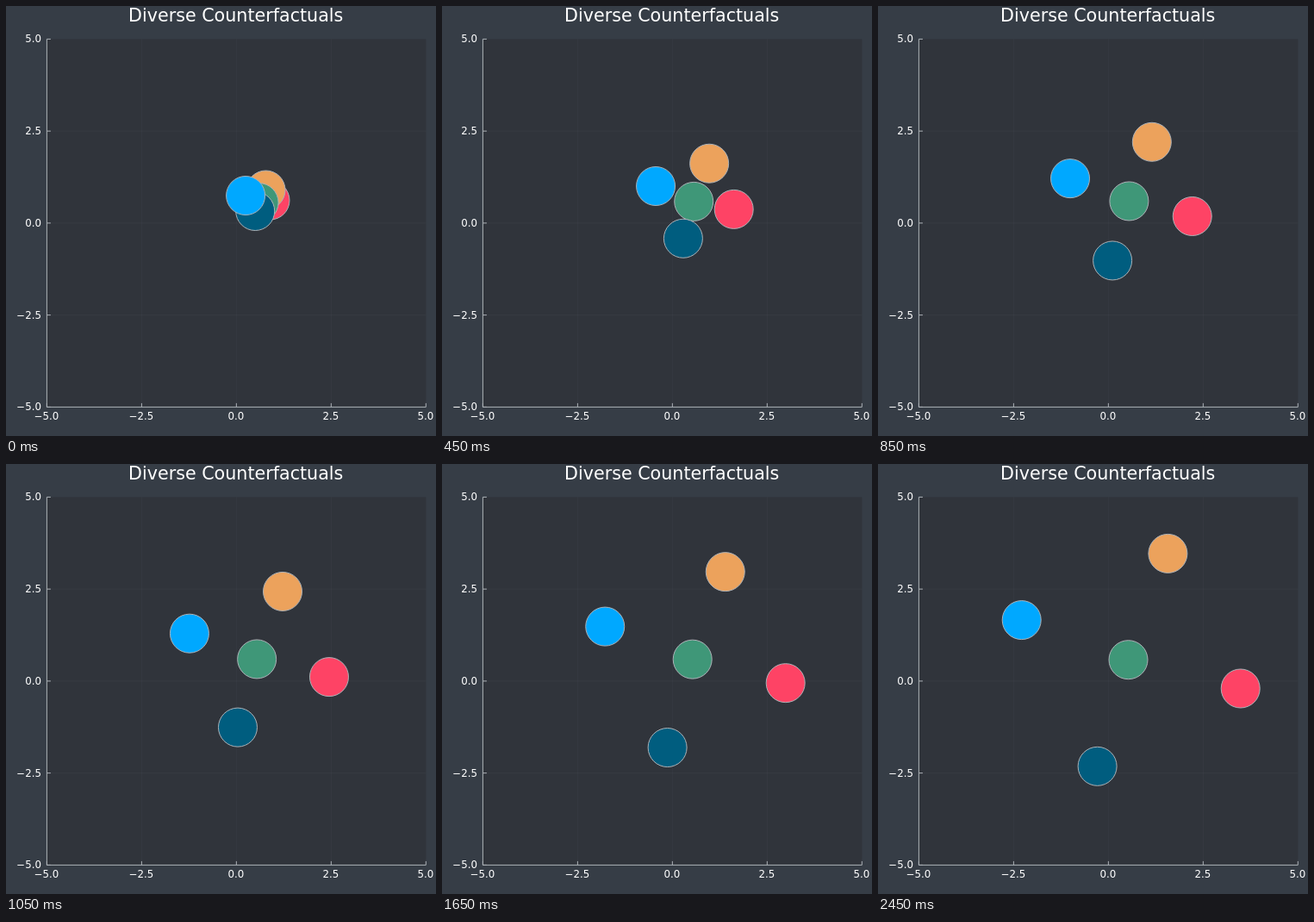
These frames come from a looping animation (499 by 499 pixels, 2.5 s). An HTML page with a canvas:

```html
<!DOCTYPE html>
<html lang="en">
<head>
<meta charset="utf-8">
<title>Diverse Counterfactuals</title>
<style>
html, body { margin: 0; height: 100%; overflow: hidden; background: #363d46; }
canvas { display: block; }
</style>
</head>
<body>
<canvas id="stage" width="499" height="499"></canvas>
<script>
const ctx = document.getElementById('stage').getContext('2d');
const FRAME = 50, FRAMES = 50, RADIUS = 22.5, TICK = 4.5;
const LEFT = 47.4, TOP = 38.4, RIGHT = 487.3, BOTTOM = 465.4;
const FG = '#adb2b7', GRID = 'rgba(173,178,183,.05)';

// Start, control and end point of each dot's path
const dots = [
  { color: '#fe4365', path: [[306.5, 225.5], [363.6, 244.3], [420.7, 260.5]] },
  { color: '#eca25c', path: [[301.5, 213.5], [316, 159], [336.4, 103.9]] },
  { color: '#3f9778', path: [[293.6, 228.1], [290.8, 225.3], [290.5, 227.2]] },
  { color: '#005d7f', path: [[289.2, 238], [273, 294.3], [254.6, 350.8]] },
  { color: '#00a8ff', path: [[278.1, 220], [225.8, 200.5], [166.7, 181.1]] },
];

// Repulsion: quick spread that slows as the dots move apart
const spread = step => Math.log(1 + 0.06 * step + 0.0171 * step * step);
const progress = step => spread(step) / spread(FRAMES - 1);

function pointOn([start, control, end], s) {
  const w = 1 - s;
  return start.map((v, i) => w * w * v + 2 * w * s * control[i] + s * s * end[i]);
}

function line(x1, y1, x2, y2, color) {
  ctx.strokeStyle = color;
  ctx.beginPath();
  ctx.moveTo(x1, y1);
  ctx.lineTo(x2, y2);
  ctx.stroke();
}

function label(text, x, y, size, align) {
  ctx.font = `${size}px "DejaVu Sans", sans-serif`;
  ctx.textAlign = align;
  ctx.fillStyle = '#fff';
  ctx.fillText(text, x, y);
}

function drawChart() {
  ctx.lineWidth = 1;
  ctx.fillStyle = '#363d46';
  ctx.fillRect(0, 0, 499, 499);
  ctx.fillStyle = '#30343b';
  ctx.fillRect(LEFT, TOP, RIGHT - LEFT, BOTTOM - TOP);
  label('Diverse Counterfactuals', 266.7, 18.2, 20.66, 'center');

  for (let i = 0; i <= 4; i++) {
    const x = LEFT + i / 4 * (RIGHT - LEFT), y = BOTTOM - i / 4 * (BOTTOM - TOP);
    const text = (i * 2.5 - 5).toFixed(1).replace('-', '\u2212');
    if (i > 0 && i < 4) {
      line(x, TOP, x, BOTTOM, GRID);
      line(LEFT, y, RIGHT, y, GRID);
    }
    line(x, BOTTOM, x, BOTTOM - TICK, FG);
    line(LEFT, y, LEFT + TICK, y, FG);
    label(text, x - 0.4, 480.3, 11.8, 'center');
    label(text, 41, y + 4, 11.8, 'right');
  }
  line(LEFT, TOP, LEFT, BOTTOM, FG);
  line(LEFT, BOTTOM, RIGHT, BOTTOM, FG);
}

function draw(now) {
  const s = progress(Math.floor(now / FRAME) % FRAMES);
  drawChart();
  for (const { color, path } of dots) {
    ctx.beginPath();
    ctx.arc(...pointOn(path, s), RADIUS, 0, 2 * Math.PI);
    ctx.fillStyle = color;
    ctx.fill();
    ctx.strokeStyle = FG;
    ctx.stroke();
  }
}

const start = performance.now();
function tick() {
  draw(performance.now() - start);
  requestAnimationFrame(tick);
}
tick();
</script>
</body>
</html>
```
